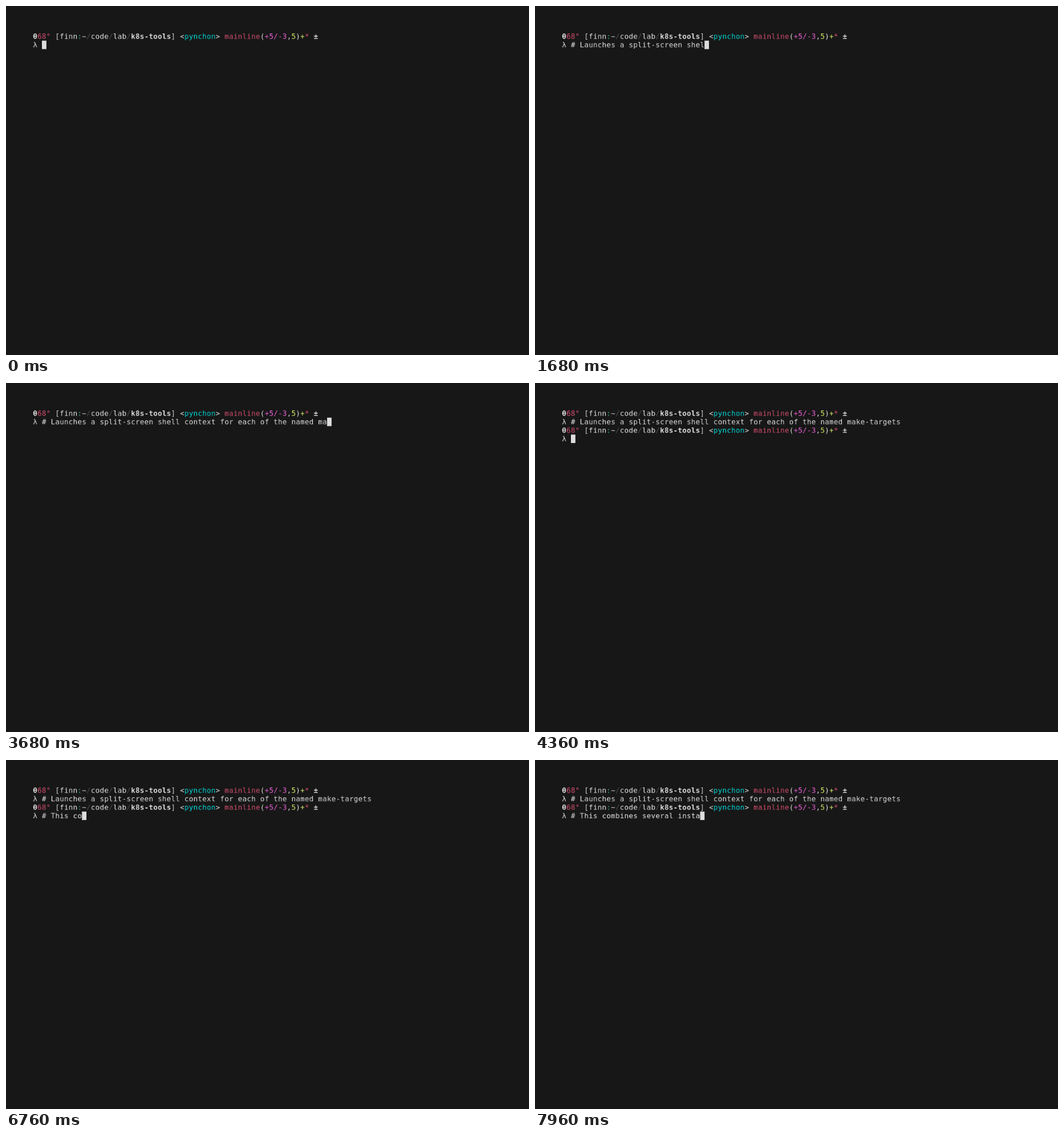
Write an HTML page with a canvas that moves like this. It is 917x611 px and loops after 8000 ms.

```html
<!DOCTYPE html>
<html lang="en">
<head>
<meta charset="utf-8">
<title>Terminal</title>
<style>
  html, body { margin: 0; width: 100%; height: 100%; overflow: hidden; background: #171717; }
  canvas { display: block; }
</style>
</head>
<body>
<canvas id="stage" width="917" height="611"></canvas>
<script>
const LOOP = 8000, TICK = 40, KEY = 58.85;
const CELL_W = 10, CELL_H = 19, BASELINE = 15;
const LEFT = 47.3, TOP = 45.8, SCALE = 0.7813;
const FONT = '16px "DejaVu Sans Mono", monospace';
const BG = '#171717', FG = '#dddddd', DIM = '#4d4d4d', RED = '#d74e6f',
      GREEN = '#31bb71', YELLOW = '#d3e561', MAGENTA = '#ed61d7', CYAN = '#04d7d7';

const PROMPT = [
  ['θ', FG, true], ['68°', RED], [' [finn', FG], [':', GREEN], ['~', FG],
  ['/', DIM], ['code', FG], ['/', DIM], ['lab', FG], ['/', DIM],
  ['k8s-tools', FG, true], ['] <', FG], ['pynchon', CYAN], ['> ', FG],
  ['mainline', RED], ['(', FG], ['+5/-3', MAGENTA], [',', FG], ['5', YELLOW],
  [')', FG], ['+', YELLOW], ['*', RED], [' ', FG], ['±', FG, true]
];
const FIRST = '# Launches a split-screen shell context for each of the named make-targets';
const SECOND = '# This combines several insta';

const stage = document.getElementById('stage').getContext('2d');

// The terminal is drawn on a whole-pixel cell grid, then scaled onto the stage.
const screen = document.createElement('canvas');
screen.width = 80 * CELL_W;
screen.height = 5 * CELL_H;
const term = screen.getContext('2d');

function write(text, col, row, color = FG, bold = false) {
  term.font = (bold ? 'bold ' : '') + FONT;
  term.fillStyle = color;
  for (const ch of text) {
    term.fillText(ch, col++ * CELL_W, row * CELL_H + BASELINE);
  }
  return col;
}

function prompt(row) {
  let col = 0;
  for (const [text, color, bold] of PROMPT) col = write(text, col, row, color, bold);
}

function command(text, row, active) {
  write('λ', 0, row);
  const col = write(text, 2, row);
  if (active) {
    term.fillStyle = FG;
    term.fillRect(col * CELL_W, row * CELL_H, CELL_W, CELL_H);
  }
}

// Text typed by time t, when its first key falls at start.
function typed(text, t, start) {
  return text.slice(0, Math.max(0, Math.floor((t - start) / KEY) + 1));
}

function draw(t) {
  term.fillStyle = BG;
  term.fillRect(0, 0, screen.width, screen.height);

  const entered = t >= 4360;
  prompt(0);
  command(t < TICK ? '' : typed(FIRST, t, -45.75), 1, !entered);
  if (entered) {
    prompt(2);
    command(typed(SECOND, t, 6284.3), 3, true);
  }

  stage.fillStyle = BG;
  stage.fillRect(0, 0, 917, 611);
  stage.imageSmoothingQuality = 'high';
  stage.drawImage(screen, LEFT, TOP, screen.width * SCALE, screen.height * SCALE);
}

const begin = performance.now();
function frame() {
  const t = (performance.now() - begin) % LOOP;
  draw(Math.floor(t / TICK) * TICK);
  requestAnimationFrame(frame);
}
frame();
</script>
</body>
</html>
```
